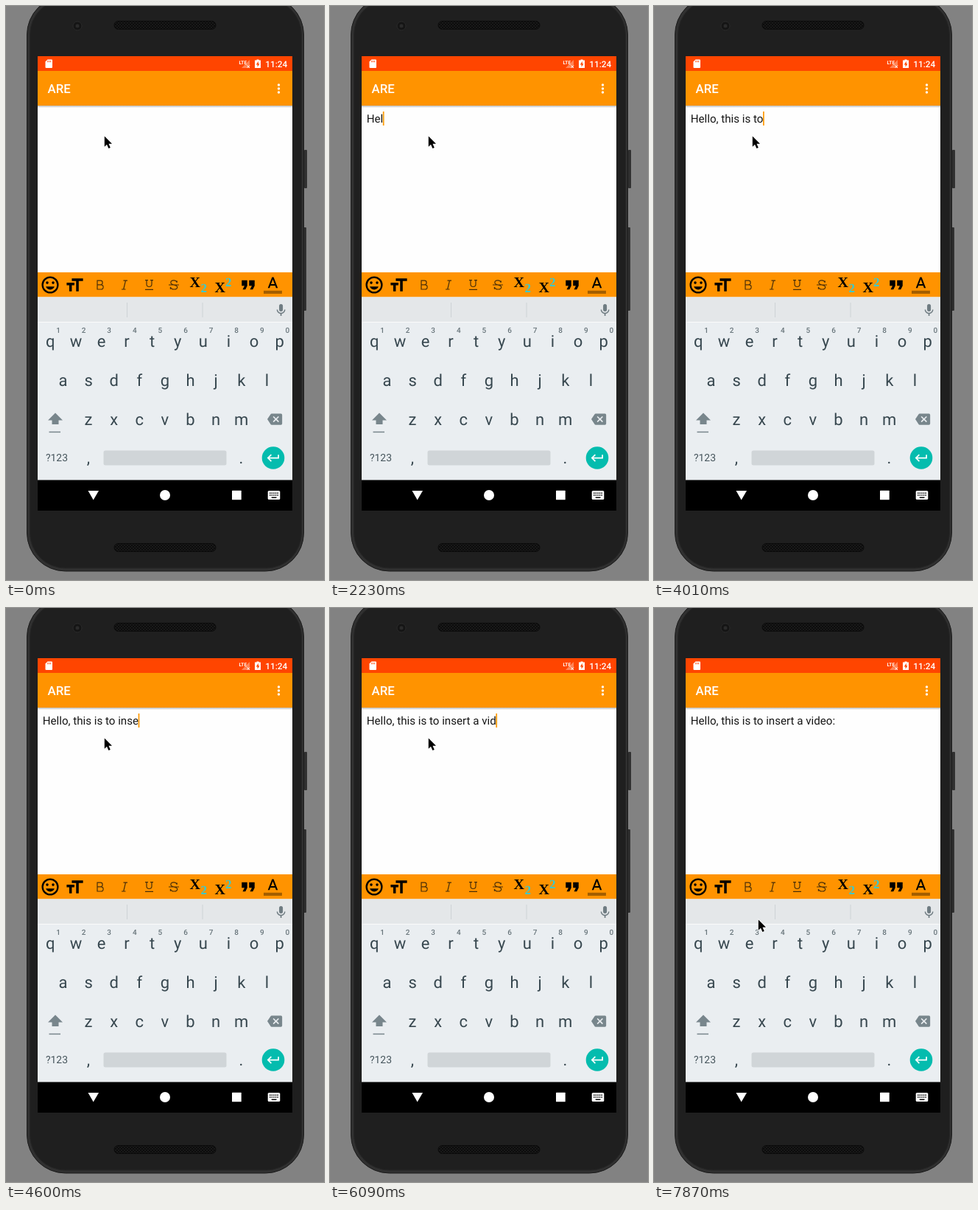
An HTML page that plays this animation: 432 by 778 pixels, repeating every 8 s.

```html
<!DOCTYPE html>
<html lang="en">
<head>
<meta charset="utf-8">
<title>Rich text editor typing</title>
<style>
  html, body { margin: 0; width: 100%; height: 100%; overflow: hidden; background: #828282; }
  svg { position: absolute; left: 0; top: 0; display: block; }
  text { font-family: Roboto, sans-serif; text-rendering: geometricPrecision; white-space: pre; }
  .medium { font-weight: 500; fill: #fff; }
  .keys { font-size: 22px; fill: #37474f; text-anchor: middle; }
  .hints { font-size: 10px; font-weight: 500; fill: #68757b; text-anchor: middle; }
  .thin { fill: none; stroke: #4a2f08; stroke-width: 1.2; }
  .serif { font: bold 20px "Liberation Serif", serif; }
  .cyan { font-size: 17px; fill: #35cbd2; }
  #typed { font-size: 15.14px; fill: #161616; }
</style>
</head>
<body>
<svg width="432" height="778" viewBox="0 0 432 778">
  <defs>
    <pattern id="mesh" width="4" height="4" patternUnits="userSpaceOnUse">
      <rect width="4" height="4" fill="#191919"/>
      <circle cx="1" cy="1" r=".9" fill="#050505"/>
      <circle cx="3" cy="3" r=".9" fill="#050505"/>
    </pattern>
    <linearGradient id="shade" x2="0" y2="1">
      <stop stop-color="#b9b9b9"/>
      <stop offset="1" stop-color="#fefefe"/>
    </linearGradient>
  </defs>

  <!-- phone body -->
  <rect x="405" y="195" width="4" height="52" rx="1" fill="#303030"/>
  <rect x="404" y="300" width="4" height="113" rx="1" fill="#303030"/>
  <rect x="28.5" y="-13" width="376" height="779" rx="52" fill="#303030" stroke="#1a1a1a"/>
  <rect x="32.5" y="-9" width="369" height="771" rx="48" fill="#1f1f1f" stroke="#262626"/>
  <circle cx="97" cy="27" r="6" fill="#151515" stroke="#2a2a2a"/>
  <circle cx="97" cy="27" r="2.5" fill="#2b2b2b"/>
  <rect x="147" y="20.500" width="138" height="11" rx="5.500" fill="url(#mesh)" stroke="#0b0b0b"/>
  <rect x="147" y="728.500" width="138" height="11" rx="5.500" fill="url(#mesh)" stroke="#0b0b0b"/>

  <!-- screen areas -->
  <rect x="43" y="68" width="346" height="616" fill="#fefefe"/>
  <rect x="43" y="68" width="346" height="20" fill="#ff4500"/>
  <rect x="43" y="88" width="346" height="47" fill="#ff9300"/>
  <rect x="43" y="135" width="346" height="3" fill="url(#shade)"/>
  <rect x="43" y="361" width="346" height="33.500" fill="#ff9300"/>
  <rect x="43" y="394.500" width="346" height="34" fill="#e4e7e9"/>
  <rect x="43" y="428" width="346" height="215" fill="#eaeef1"/>
  <rect x="43" y="428" width="346" height="1" fill="#fafbfb"/>
  <rect x="43" y="642.500" width="346" height="41.500" fill="#000"/>

  <!-- status bar -->
  <g fill="#fff">
    <path d="M56.500 72.500H62a1 1 0 0 1 1 1V83a1 1 0 0 1-1 1H54.500a1 1 0 0 1-1-1V75.500z"/>
    <path d="M56.700 74v2.300M58.700 74v2.300M60.700 74v2.300" stroke="#ff4500" stroke-width=".9"/>
    <path d="M331 73V84H320z" opacity=".35"/>
    <text x="316.500" y="78.500" font-size="6.500" font-weight="700">LTE</text>
    <path d="M327.500 80.500l3.500 3.500m0-3.500l-3.500 3.500" stroke="#fff"/>
    <path d="M340.500 72.500h3v1H346V84h-8V73.500h2.500z"/>
    <path d="M342.800 74.700l-3 4.700h1.800v3.400l2.900-4.600h-1.700z" fill="#ff4500"/>
  </g>
  <text class="medium" x="352.300" y="82.700" font-size="11.800">11:24</text>

  <!-- app bar -->
  <text class="medium" x="56.500" y="118" font-size="16.800">ARE</text>
  <g fill="#fff">
    <circle cx="370.500" cy="107" r="1.700"/>
    <circle cx="370.500" cy="112" r="1.700"/>
    <circle cx="370.500" cy="117" r="1.700"/>
  </g>

  <!-- formatting toolbar -->
  <g transform="translate(60 378)">
    <circle r="10.400" fill="none" stroke="#000" stroke-width="2.300"/>
    <circle cx="-4" cy="-2.900" r="1.800"/>
    <circle cx="4" cy="-2.900" r="1.800"/>
    <path d="M-5.900 2.300H5.900A6.300 6.300 0 0 1-5.900 2.300z"/>
  </g>
  <path transform="translate(78.900 364.500) scale(1.170)" d="M9 4v3h5v12h3V7h5V4H9zm-6 8h3v7h3v-7h3V9H3v3z"/>
  <g class="thin">
    <path d="M124 372.200h4.300a2.800 2.800 0 0 1 0 5.600H124h5a3.100 3.100 0 0 1 0 6.200H124z"/>
    <path d="M159.500 372.200h5.500M157 384h5.500M162.500 372.200L159.700 384"/>
    <path d="M189 371.700h4M196 371.700h4M191 371.700v5.300a3.500 3.500 0 0 0 7 0v-5.300M189 384.300h11"/>
    <path d="M232.300 374.700v-2.200M232.300 374.700c-.8-2-2.500-2.800-4.400-2.800-2.300 0-4 1.200-4 3 0 4.200 8.800 2.200 8.800 6 0 1.900-1.900 3.100-4.400 3.100-2.300 0-4.300-1-4.900-3v2.700M221 378h14"/>
  </g>
  <text class="serif" x="249.500" y="381">X</text>
  <text class="serif cyan" x="264.500" y="388">2</text>
  <text class="serif" x="283.500" y="388">X</text>
  <text class="serif cyan" x="298" y="379.500">2</text>
  <path transform="translate(314 363) scale(1.250)" d="M6 17h3l2-4V7H5v6h3zm8 0h3l2-4V7h-6v6h3z"/>
  <g transform="translate(350 364.500) scale(1.040)">
    <path d="M11 3L5.500 17h2.250l1.120-3h6.250l1.120 3h2.250L13 3zM9.620 12L12 5.670 14.380 12z"/>
    <path d="M0 20.500h24v4H0z" opacity=".36"/>
  </g>

  <!-- keyboard -->
  <path d="M164.500 402v20M267 402v20" stroke="#cdd3d6"/>
  <path transform="translate(363.500 402.300) scale(.840)" fill="#6f7c82" d="M12 14a3 3 0 0 0 3-3V5a3 3 0 0 0-6 0v6a3 3 0 0 0 3 3zm5.300-3c0 3-2.540 5.100-5.300 5.100S6.700 14 6.700 11H5c0 3.410 2.720 6.230 6 6.720V21h2v-3.280c3.280-.48 6-3.300 6-6.720z"/>
  <g id="keys" class="keys"></g>
  <g id="hints" class="hints"></g>
  <g fill="#78868c">
    <path d="M67 551.500L77 561.500H71.500V567H62.500V561.500H57z"/>
    <rect x="58.500" y="576.700" width="15.500" height="1.500"/>
    <path transform="translate(355 550) scale(.840)" d="M22 3H7c-.7 0-1.230.35-1.590.88L0 12l5.410 8.110c.36.53.9.89 1.590.89h15a2 2 0 0 0 2-2V5a2 2 0 0 0-2-2zm-3 12.590L17.590 17 14 13.410 10.410 17 9 15.590 12.590 12 9 8.410 10.410 7 14 10.590 17.590 7 19 8.410 15.410 12z"/>
  </g>
  <text x="54" y="617" font-size="13.900" fill="#45545b">?123</text>
  <rect x="132.500" y="602.500" width="167" height="20" rx="2.500" fill="#d0d5d8"/>
  <circle cx="363" cy="612.500" r="15.300" fill="#04bcae"/>
  <path transform="translate(352.900 602.300) scale(.860)" fill="#fff" d="M19 7v4H5.830l3.580-3.590L8 6l-6 6 6 6 1.410-1.410L5.830 13H21V7z"/>

  <!-- navigation bar -->
  <g fill="#fff">
    <path d="M111.500 657H126L118.700 669.500z"/>
    <circle cx="216" cy="663" r="7"/>
    <rect x="307" y="656.700" width="12.700" height="12.500" rx=".5"/>
    <rect x="355.700" y="657" width="16.600" height="12" rx="1.600"/>
  </g>
  <g stroke="#000" stroke-width="1.500" fill="none">
    <path d="M358 660.300h12.500M358 663h12.500" stroke-dasharray="1.500 1.100"/>
    <path d="M360.700 666.300h6.800"/>
  </g>

  <!-- document -->
  <text id="typed" x="49.730" y="158"></text>
  <rect id="caret" width="1.700" height="19" fill="#ff9800"/>
  <path id="pointer" d="M0 0V14.200L3.200 11.200 5.600 16.500 8 15.500 5.700 10.300H10.200z" stroke="#fff" stroke-width="1.300" paint-order="stroke"/>
</svg>

<script>
  const LOOP = 8000;
  const LEFT = 49.73;
  const LINE = "Hello, this is to insert a video:";
  const byId = id => document.getElementById(id);
  const typed = byId("typed"), caret = byId("caret"), pointer = byId("pointer");

  // [time in ms, characters typed]; one past the line's end means a line break
  const strokes = [
    [0, 0], [1040, 1], [1340, 2], [2090, 3], [2240, 4], [2380, 5],
    [2830, 6], [2980, 7], [3120, 9], [3270, 10], [3420, 11], [3560, 13], [3710, 15],
    [4010, 17], [4160, 19], [4300, 20], [4450, 21], [4600, 22], [4740, 23], [4890, 25],
    [5340, 26], [5490, 27], [5790, 28], [5940, 29], [6090, 30], [6240, 31], [6390, 32],
    [6980, 33], [7280, 34]
  ];
  const caretOff = [[0, 600], [1790, 2090], [6840, 6980], [7720, LOOP]];

  function addRow(parent, chars, x, y) {
    [...chars].forEach((char, i) => {
      const label = document.createElementNS("http://www.w3.org/2000/svg", "text");
      label.setAttribute("x", x + i * 34.6);
      label.setAttribute("y", y);
      label.textContent = char;
      byId(parent).append(label);
    });
  }
  addRow("keys", "qwertyuiop", 60.3, 462);
  addRow("keys", "asdfghjkl", 77.6, 514.7);
  addRow("keys", "zxcvbnm", 112, 567.7);
  addRow("keys", ",", 112, 620);
  addRow("keys", ".", 319.5, 620);
  addRow("hints", "1234567890", 71, 443);

  function draw(t) {
    const count = strokes.findLast(([start]) => start <= t)[1];
    const text = LINE.slice(0, count);
    if (typed.textContent !== text) typed.textContent = text;

    const newLine = count > LINE.length;
    const x = newLine || !count ? LEFT : LEFT + typed.getComputedTextLength();
    caret.setAttribute("x", x - 0.4);
    caret.setAttribute("y", newLine ? 161 : 143);
    const hidden = caretOff.some(([from, to]) => t >= from && t < to);
    caret.setAttribute("visibility", hidden ? "hidden" : "visible");

    const spot = t < 7870 ? "133.8 176.500" : "141.800 422.500";
    pointer.setAttribute("transform", `translate(${spot})`);
  }

  const begin = performance.now();
  function tick() {
    draw((performance.now() - begin) % LOOP);
    requestAnimationFrame(tick);
  }
  tick();
</script>
</body>
</html>
```
